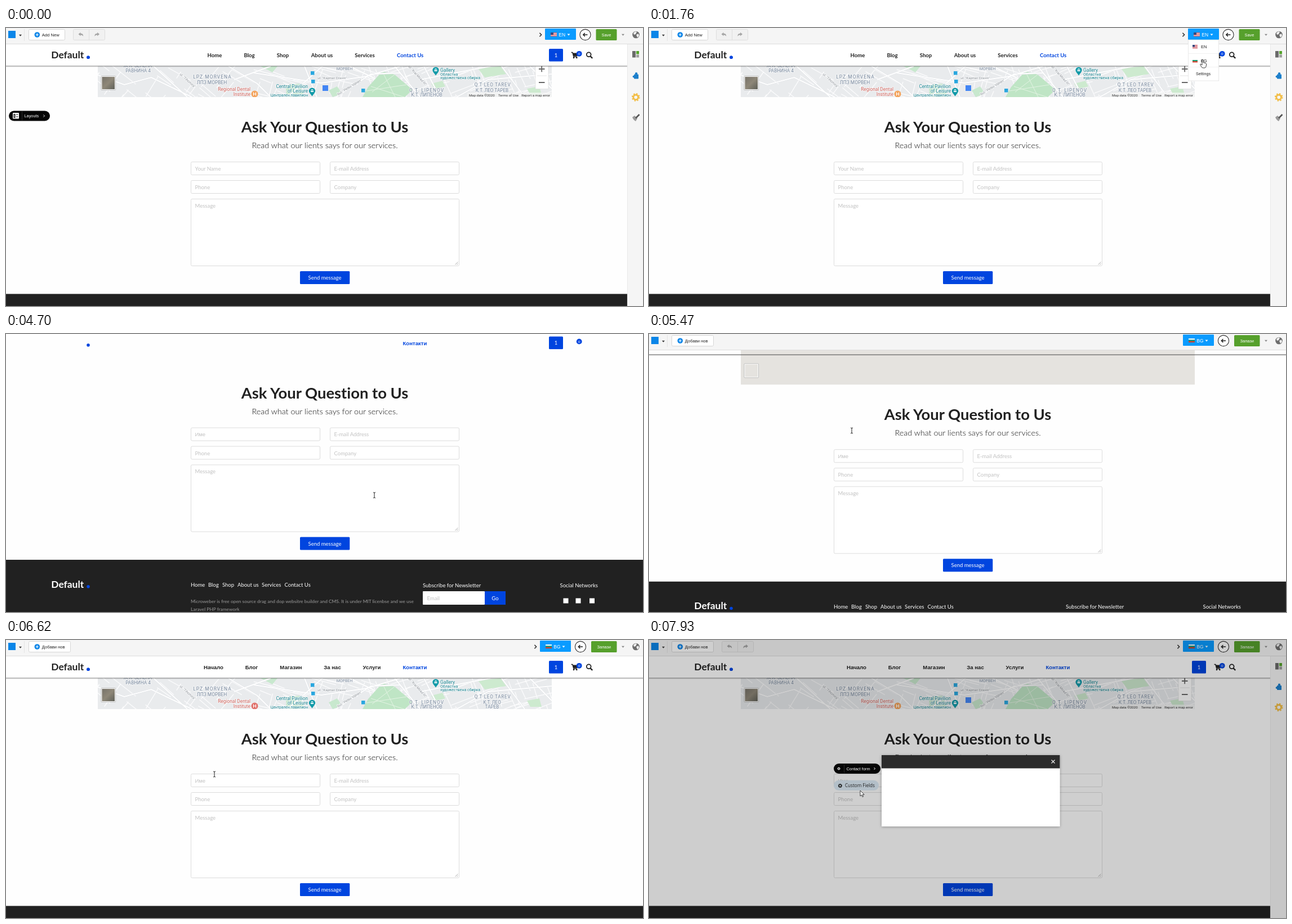
These frames come from a looping animation (1131x495 px, 8000 ms). An HTML page:

```html
<!DOCTYPE html>
<html lang="en">
<head>
<meta charset="utf-8">
<title>Language switch</title>
<style>
html, body { margin: 0; width: 100%; height: 100%; overflow: hidden; background: #fff; }
svg { display: block; width: 100vw; height: 100vh; }
text { white-space: pre; font-variant-ligatures: none; }
.ui { font-family: "Liberation Sans", Arial, sans-serif; }
.page { font-family: Lato, sans-serif; }
.map { font-family: Roboto, "Noto Sans", sans-serif; }
</style>
</head>
<body>
<svg id="stage" viewBox="0 0 1131 495" xmlns="http://www.w3.org/2000/svg"></svg>
<script>
const LOOP = 8000, BLUE = '#0045df', INK = '#212121';

const rect = (x, y, w, h, fill, extra = '') =>
  `<rect x="${x}" y="${y}" width="${w}" height="${h}" fill="${fill}" ${extra}/>`;
const circle = (x, y, r, fill, extra = '') =>
  `<circle cx="${x}" cy="${y}" r="${r}" fill="${fill}" ${extra}/>`;
const path = (d, stroke, width = 1, extra = '') =>
  `<path d="${d}" fill="none" stroke="${stroke}" stroke-width="${width}" ${extra}/>`;
const shape = (d, fill, extra = '') => `<path d="${d}" fill="${fill}" ${extra}/>`;
const text = (x, y, s, size, fill, extra = '') =>
  `<text x="${x}" y="${y}" font-size="${size}" fill="${fill}" ${extra}>${s}</text>`;
const group = (id, body, extra = '') => `<g id="${id}" ${extra}>${body}</g>`;
const MID = 'text-anchor="middle"', END = 'text-anchor="end"';
const MID_BOLD = MID + ' font-weight="700"';

const caret = (x, y, fill) => shape(`M${x - 2.5} ${y - 1.2}h5l-2.5 3z`, fill);
const chevron = (x, y, s, color, w) => path(`M${x - s / 2} ${y - s}l${s} ${s}l${-s} ${s}`, color, w);
const gear = (x, y, r, fill) =>
  circle(x, y, r * .6, 'none', `stroke="${fill}" stroke-width="${r * .4}"`) +
  circle(x, y, r * .88, 'none',
    `stroke="${fill}" stroke-width="${r * .28}" stroke-dasharray="${r * .3456}"`);

function seeded(seed) {
  return () => (seed = (seed * 16807) % 2147483647) / 2147483647;
}

function usFlag(x, y, w, h) {
  let s = rect(x, y, w, h, '#f3e6e8');
  for (let i = 0; i < 4; i++) s += rect(x, y + i * h / 3.5, w, h / 7, '#d0505c');
  return s + rect(x, y, w * .45, h * .55, '#35477d');
}
const bgFlag = (x, y, w, h) =>
  rect(x, y, w, h / 3, '#fff') + rect(x, y + h / 3, w, h / 3, '#159a70') +
  rect(x, y + h * 2 / 3, w, h / 3, '#d33b28');

/* Map */
function streets() {
  const rnd = seeded(71);
  let s = '';
  for (let i = 0; i < 150; i++) {
    const x = 150 + rnd() * 830, y = 60 + rnd() * 70, len = 14 + rnd() * 48;
    const a = (x < 420 ? .5 : x < 640 ? .18 : -.45) + (rnd() < .5 ? Math.PI / 2 : 0) + rnd() * .25;
    const dx = Math.cos(a) * len, dy = Math.sin(a) * len;
    s += `M${x.toFixed(1)} ${y.toFixed(1)}l${dx.toFixed(1)} ${dy.toFixed(1)}`;
  }
  return path(s, '#fcfcfd', 1.3);
}

function mapArt() {
  const main = 'M163 84L210 101 258 88 330 123M262 68L322 123M395 68L446 99 470 123M405 92L470 68' +
    'M440 80L560 98 640 86 700 68M530 68L552 123M500 123L562 68M586 123L648 82 700 80M610 68L655 90' +
    'M742 68L770 123M690 68L735 123M735 92L860 68M800 123L856 92 969 82M880 68L921 123M930 68L969 108';
  const label = (x, y, s, size, fill = '#75859a', extra = '') => text(x, y, s, size, fill, extra);
  const teal = '#16818d', halo = 'stroke="#f8f9fa" stroke-width="1.6" paint-order="stroke"';
  const pin = (x, y, c) => circle(x, y, 5.6, c) + shape(`M${x - 4.4} ${y + 3.4}h8.8l-4.4 6z`, c) +
    shape(`M${x - 3} ${y - 1}l3-2 3 2zM${x - 2.5} ${y}h5v2h-5z`, '#fff');
  return rect(163, 40, 806, 83, '#e9ebed') + streets() +
    shape('M668 77L690 83 722 110 708 123H633L643 105z', '#bfe5c5') +
    shape('M497 102l24-3 10 24h-33zM573 111l15-7 9 13-17 6zM452 68h30l-9 11z', '#c8e8ce') +
    shape('M755 99l20-5 5 10-19 5zM838 72l40-4 10 14-38 6zM925 108l22-4 4 15h-20z', '#cdeacf') +
    path('M648 104L707 123M650 114L690 83M668 77L691 123M640 112L711 101', '#e3f3e3', 1) +
    path(main, '#dde0e5', 2.8) + path(main, '#fff', 2) +
    `<g ${halo}>` +
    label(234, 70, 'Ж.К. ЗЕЛЕНА', 8.2, undefined, MID) +
    label(234.5, 79, 'РАВНИНА 4', 8.2, undefined, MID) +
    label(366.5, 90, 'LPZ MORVENA', 8.4, undefined, MID + ' letter-spacing="1.1"') +
    label(365.5, 100, 'ЛПЗ МОРВЕН', 8.4, undefined, MID) +
    label(434, 112, 'Regional Dental', 8.3, '#cf625a', END) +
    label(434, 120.5, 'Institute', 8.3, '#cf625a', END) +
    label(536, 107, 'Central Pavilion', 8.2, teal, END) +
    label(536, 115, 'of Leisure', 8.2, teal, END) +
    label(536, 121.5, 'Централен павилион', 6.7, teal, END) +
    label(771, 77.5, 'Gallery', 8.5, teal) +
    label(771, 84.5, 'Областна', 7, teal) +
    label(771, 91, 'художествена сбирка', 7, teal) +
    label(601, 75, 'МОРВЕН', 7, undefined, MID) +
    label(747, 114, 'Q.T. LIPENOV', 8.4, undefined, MID + ' letter-spacing="1"') +
    label(747, 122, 'К.Т. ЛИПЕНОВ', 8.4, undefined, MID) +
    label(864, 104, 'Q T LEO TAREV', 8.2, undefined, MID + ' letter-spacing=".7"') +
    label(579, 90.5, 'ul. "Kapitan Dravin"', 6.2, '#8b9096', MID) +
    label(0, 0, 'bul. "Petko Valnev"', 6, '#8b9096', 'transform="translate(590 120) rotate(-32)"') +
    label(0, 0, 'ul. "Tihomira"', 6, '#8b9096', 'transform="translate(308 83) rotate(42)"') +
    label(0, 0, 'ul. "Kral Mirad III"', 6, '#8b9096', 'transform="translate(714 69) rotate(48)"') +
    '</g>' +
    pin(543.5, 112, '#129aa8') + pin(763, 75, '#129aa8') +
    [[541, 77], [542, 92], [631, 108]].map(([x, y]) => rect(x, y, 6.5, 6.5, '#2aa7df')).join('') +
    circle(441.5, 117.5, 6, '#f3a35c', 'id="clinic"') +
    path('M439.5 114.5v6M443.5 114.5v6M439.5 117.5h4', '#fff', 1.2) +
    group('oneLine', `<g ${halo}>` + label(863, 113.5, 'К.Т. ЛЕО ТАРЕВ', 8.2, undefined, MID) + '</g>') +
    group('twoLines', `<g ${halo}>` + label(863, 113.5, 'К.Т. ЛЕО', 8.2, undefined, MID) +
      label(863, 121.5, 'ТАРЕВ', 8.2, undefined, MID) + '</g>');
}

const credit = rect(562, 102, 10, 10, '#4285f4') + rect(819, 115, 150, 8, '#f5f5f5', 'opacity=".75"') +
  text(822, 121.5, 'Map data ©2020', 6.1, '#333') + text(874, 121.5, 'Terms of Use', 6.1, '#333') +
  text(966, 121.5, 'Report a map error', 6.1, '#333', END);

const zoom = rect(940, 62, 23, 46.5, '#fff', 'stroke="#d8d8d8" stroke-width=".6"') +
  path('M943 85h17', '#e3e3e3') + path('M946 73h10.5M951.2 67.8v10.4M946 97h10.5', '#666', 1.8);

const thumb = rect(169, 85.5, 25.5, 25, '#fff', 'stroke="#aaa" stroke-width=".7" rx="1"') +
  rect(170.5, 87, 22.5, 22, '#e5e3df');

/* Page body */
const field = (x, y, w, h) =>
  rect(x + .5, y + .5, w - 1, h - 1, '#fff', 'stroke="#dcdcdc" rx="2"');
const hint = (x, y, s) => text(x, y, s, 9.5, '#c2c2c2');
const dotLogo = (y, fill) => text(80.3, y, 'Default', 17.4, fill, 'font-weight="700"') +
  circle(146, y - 1.8, 2.8, BLUE);

const form = text(566, 186, 'Ask Your Question to Us', 27.4, INK, MID_BOLD) +
  text(566, 214, 'Read what our lients says for our services.', 14.4, '#111', MID + ' font-weight="300"') +
  field(328, 238, 230, 24) + field(575, 238, 230, 24) +
  field(328, 271, 230, 24) + field(575, 271, 230, 24) + field(328, 304, 477, 120) +
  group('nameEn', hint(335.5, 253.5, 'Your Name')) +
  group('nameBg', hint(335.5, 253.5, 'Име'), 'class="ui"') +
  hint(582.5, 253.5, 'E-mail Address') + hint(335.5, 287, 'Phone') +
  hint(582.5, 287, 'Company') + hint(335.5, 319.5, 'Message') +
  path('M797.5 421.5l5-5M800.5 421.5l2-2', '#999', .8) +
  rect(522, 433, 88.3, 23, BLUE, 'rx="1.5"') + text(566, 448, 'Send message', 9.5, '#fff', MID);

const footLink = (x, y, s) => text(x, y, s, 9.5, '#fff');
const footer = rect(0, 473.5, 1131, 140, INK) + dotLogo(523, '#fff') +
  [[328, 'Home'], [359, 'Blog'], [384, 'Shop'], [411, 'About us'], [454, 'Services'], [494.5, 'Contact Us']]
    .map(([x, s]) => footLink(x, 521.5, s)).join('') +
  text(328, 550.5, 'Microweber is free open source drag and dop websitre builder and CMS. It is under MIT licenbse and we use', 8.4, '#9c9c9c') +
  text(328, 564.5, 'Laravel PHP framework', 8.4, '#9c9c9c') +
  footLink(740, 522, 'Subscribe for Newsletter') + footLink(983.5, 522, 'Social Networks') +
  rect(740, 529.5, 110, 24, '#fff', 'rx="1"') + hint(747.5, 545, 'Email') +
  rect(850, 529.5, 37, 24, BLUE) + text(868.5, 545, 'Go', 9.5, '#fff', MID) +
  [989.5, 1011.5, 1036].map(x => rect(x, 542, 9, 9, '#fff')).join('');

/* Site header */
const navItem = (x, y, s, fill) => text(x, y, s, 9.6, fill, MID_BOLD);
const navEn = [[370.5, 'Home'], [432, 'Blog'], [491.5, 'Shop'], [561, 'About us'], [637, 'Services']]
  .map(([x, s]) => navItem(x, 51.7, s, INK)).join('') + navItem(717.7, 51.7, 'Contact Us', BLUE);
const navBg = [[368.5, 'Начало'], [436, 'Блог'], [506, 'Магазин'], [579.5, 'За нас'], [649.5, 'Услуги']]
  .map(([x, s]) => navItem(x, 52, s, INK)).join('');
const blueParts = circle(146, 52.2, 2.8, BLUE) + rect(964, 37, 25, 22.5, BLUE, 'rx="1.5"') +
  text(976.5, 51.5, '1', 9.5, '#fff', MID) + circle(1017.7, 45.8, 4.9, BLUE) +
  text(1017.7, 48.2, '0', 6.5, '#fff', MID);
const cart = path('M1003.5 43.5h2.4l2 7.8h6.3', INK, 1.4) + shape('M1006.3 44.5h9.5l-1.2 5.6h-7z', INK) +
  circle(1008, 53, 1.3, INK) + circle(1013.3, 53, 1.3, INK);
const loupe = circle(1034.7, 47.3, 3.9, 'none', `stroke="${INK}" stroke-width="1.8"`) +
  path('M1037.6 50.3l3.6 3.6', INK, 2.3);

/* Editor chrome */
const saveSet = (x, w, label, size) => rect(x, 2, w, 20, '#56a02c', 'rx="1.5"') +
  text(x + w / 2, 14.8, label, size, '#fff', MID);
const addButton = (w, label) => rect(40.5, 2.5, w, 19, '#fff', 'stroke="#d6d6d6" rx="2"') +
  circle(55.3, 12, 4.8, '#0b86e8') + path('M52.8 12h5M55.3 9.5v5', '#fff', 1.2) +
  text(63.7, 14.9, label, 7.65, '#222');
const langButton = (x, label, flag) => rect(x, 1, 55, 20, '#0a9bff', 'rx="1"') + flag +
  text(x + 24.3, 14.5, label, 8.5, '#fff') + caret(x + 42, 11.6, '#fff');
const backButton = x => circle(x, 12, 9.6, '#fff', 'stroke="#333" stroke-width="1.1"') +
  path(`M${x + 4} 12h-7.5M${x - .6} 9l-3 3 3 3`, '#222', 1.6);
const undo = x => rect(x + .5, 2.5, 56, 19, '#f1f1f1', 'stroke="#dedede" rx="2"') +
  path(`M${x + 28.5} 3v18`, '#dedede') +
  shape(`M${x + 9.5} 11l4-3.2v2q5 0 4.6 5-1.3-2.6-4.6-2.5v2z`, '#a5a5a5') +
  shape(`M${x + 47} 11l-4-3.2v2q-5 0-4.6 5 1.3-2.6 4.6-2.5v2z`, '#a5a5a5');

const toolbar = rect(0, 0, 1131, 29, '#f5f5f5') + path('M0 28.5h1131', '#dcdcdc') +
  rect(4, 5, 13, 13, '#0b86e8') + caret(25.5, 13, '#333') + path('M32.5 2v21', '#e4e4e4') +
  caret(1095.5, 12, '#888') + circle(1118.5, 12, 6.3, '#6d6d6d') +
  shape('M1114 9q3-4 6-2l-2 4-3 1zM1119 12l4-2 1 4-3 3z', '#f0f0f0') +
  group('barEn', addButton(64, 'Add New') + undo(119) + chevron(949, 12, 3.2, '#333', 1.6) +
    langButton(957, 'EN', usFlag(967, 8, 11, 7)) + backButton(1028.5) + saveSet(1047.5, 37, 'Save', 7.4)) +
  group('barBg', addButton(74, 'Добави нов') + group('undoBg', undo(129)) +
    group('moreBg', chevron(940, 12, 3.2, '#333', 1.6)) +
    langButton(948, 'BG', bgFlag(958, 8, 11, 7)) + backButton(1020) + saveSet(1039, 45.5, 'Запази', 7.5));

const sidebar = rect(1103, 29, 28, 466, '#f5f5f5') + path('M1103.4 29v466', '#e6e6e6', .8) +
  rect(1112, 41, 6, 11.5, '#6b6b6b') + rect(1119, 41, 5, 5.5, '#57a52e') + rect(1119, 47.5, 5, 5, '#a0a0a0') +
  group('puzzle', rect(1115, 82.5, 8, 8, '#1c7fcb', 'rx=".8"') +
    circle(1119, 81.2, 2.2, '#1c7fcb') + circle(1114.6, 86.5, 2, '#1c7fcb')) +
  group('cog', gear(1118.2, 123.3, 7.2, '#f2bd45')) +
  group('brush', shape('M1112 159l4-3 5 5-3 5q-4-2-6-7z', '#9a9a9a') + path('M1118 160.5l6.5-6.5', '#555', 2.6));

const menu = rect(957.3, 21, 54.4, 73, '#fff', 'stroke="#ddd" stroke-width=".7"') +
  path('M957.5 45.5h54M957.5 69.5h54', '#eee', .8) + usFlag(965, 30, 9, 6.5) +
  text(985.2, 36, 'EN', 7.6, '#222', MID) + bgFlag(965, 54.8, 9, 6.5) +
  text(985.2, 60.5, 'BG', 7.6, '#222', MID) + text(984, 84.3, 'Settings', 7.2, '#222', MID);

const pill = (x, y, w, split, label, icon) => rect(x, y, w, 18, '#050505', 'rx="9"') +
  path(`M${split} ${y + 1}v16`, '#333', .8) + text(split + 4, y + 11.5, label, 7.35, '#fff') +
  chevron(x + w - 10.5, y + 9, 2, '#fff', 1) + icon;
const layouts = pill(5, 147.5, 73, 28.5, 'Layouts',
  rect(12, 151, 11, 10.5, '#fff', 'rx="1"') + path('M14 153.5h2v6h-2zM18 154h3.5M18 158h3.5', '#111', 1.2));
const envelope = rect(334, 225, 12.5, 8.5, '#e0149c') +
  path('M334 225l6.2 5 6.3-5M334 233.5l4.5-4.5M346.5 233.5l-4.5-4.5', '#300', .9);
const corners = [[328.5, 238.5], [804.5, 238.5], [328.5, 433.5], [804.5, 433.5]]
  .map(([x, y]) => rect(x - 1.5, y - 1.5, 3, 3, '#a9b7c4')).join('');
const picked = rect(328.5, 238.5, 476, 195, 'none', 'stroke="#b7cbdd"') + corners +
  pill(328, 220, 89, 352, 'Contact form', envelope);
const fieldsPill = fill => rect(328, 249.8, 80, 18, fill, 'rx="9"') + gear(339.3, 259.5, 3.6, '#222') +
  text(348, 262, 'Custom Fields', 8.1, '#222', 'font-family="Open Sans, sans-serif"');

const modal = rect(413, 205, 316.5, 127, '#fff', 'filter="url(#soft)"') +
  rect(413, 205, 316.5, 23.5, '#2b2b2b') + path('M714.5 213.5l6 6M720.5 213.5l-6 6', '#eee', 1.2);

document.getElementById('stage').innerHTML = `<defs>
  <clipPath id="mapClip"><rect x="163" y="29" width="806" height="94"/></clipPath>
  <linearGradient id="photo" x2="1" y2="1"><stop stop-color="#77736a"/><stop offset=".5" stop-color="#8e8778"/><stop offset="1" stop-color="#5f6058"/></linearGradient>
  <linearGradient id="shade" x2="0" y2="1"><stop stop-color="#000" stop-opacity=".38"/><stop offset="1" stop-color="#000" stop-opacity="0"/></linearGradient>
  <filter id="soft" x="-10%" y="-10%" width="120%" height="125%"><feDropShadow dx="0" dy="1" stdDeviation="2.5" flood-opacity=".3"/></filter>
  </defs>` + rect(0, 0, 1131, 495, '#fefefe') +
  group('body',
    group('map', rect(163, 29, 806, 94, '#e5e3df') + group('mapArt', mapArt()) + thumb +
      group('photoTile', rect(170.5, 87, 22.5, 22, 'url(#photo)')) +
      group('credit', credit) + group('zoom', zoom), 'class="map" clip-path="url(#mapClip)"') +
    form + footer, 'class="page"') +
  group('header',
    group('headerBack', rect(0, 29, 1131, 38.5, '#fff') + rect(0, 67, 1131, 3, 'url(#shade)')) +
    group('headerLine', path('M0 68h1131', '#444', 1.1)) +
    group('headerInk', dotLogo(54, INK) + cart + loupe) + blueParts +
    group('navEn', navEn) + group('navBg', navBg, 'class="ui"') +
    group('navHere', navItem(726, 52, 'Контакти', BLUE), 'class="ui"'), 'class="page"') +
  group('chrome', group('sidebar', sidebar) + group('toolbar', toolbar) + group('menu', menu) +
    group('layouts', layouts) + group('picked', picked) + group('fields', fieldsPill('#dce7ef')), 'class="ui"') +
  group('dim', rect(0, 0, 1131, 495, '#000')) +
  group('editing', pill(328, 220, 83, 346.5, 'Contact form', gear(337, 229, 2.6, '#fff')) +
    fieldsPill('#b3bfc8'), 'class="ui"') +
  group('modal', modal) +
  group('arrow', shape('M0 0v10l2.4-2.2 1.6 3.6 1.6-.7-1.6-3.5h3.2z', '#fff', 'stroke="#111" stroke-width=".8"')) +
  group('hand', shape('M-1 .5q1-1.2 2 0v5l4 1q1.8.6 1.7 2.5l-.7 3.5q-.5 2-2 2.5h-4q-2-.5-4.2-5.5-.4-1.8 1.2-1.2l2 1.7z', '#fff', 'stroke="#111" stroke-width=".8"')) +
  group('beam', path('M-2-5q2 0 2 1.2q0-1.2 2-1.2M0-4v8M-2 5q2 0 2-1.2q0 1.2 2 1.2', '#222', 1));

const el = id => document.getElementById(id);
const show = (id, on) => el(id).style.display = on ? '' : 'none';
const move = (id, x, y) => el(id).setAttribute('transform', `translate(${x} ${y})`);

/* time, then values; movement advances in short steps like a screen recording */
const STEP = 76.7;
function track(keys, t) {
  let i = keys.length - 1;
  while (i > 0 && keys[i][0] > t) i--;
  const a = keys[i], b = keys[i + 1];
  if (!b) return a.slice(1);
  const u = Math.min(1, Math.floor((t - a[0]) / STEP + .01) * STEP / (b[0] - a[0]));
  const k = u * u * (3 - 2 * u);
  return a.slice(1).map((v, j) => v + (b[j + 1] - v) * k);
}

const cursorPath = [[70, 1088, 460], [830, 985, 10], [910, 986, 12], [1680, 983, 56],
  [2310, 983, 56], [2770, 661, 286], [3630, 661, 286], [3860, 662, 284], [4623, 662, 284],
  [4700, 654, 287], [5470, 360, 172], [6240, 370, 239], [6620, 370, 239], [6930, 362, 352],
  [7160, 354, 244], [7240, 355, 245], [7390, 360, 250], [7550, 370, 256], [7700, 371, 254],
  [7850, 375, 267], [7930, 375, 268]];
const bodyShift = [[4700, -71.5], [5163, -71.5], [5470, -32.7], [6240, 0]];
const headerShift = [[4700, -32.4], [5470, -31], [5550, -31], [6240, 0]];

function draw(t) {
  const within = (a, b) => t >= a && t < b;
  const bg = t >= 4700, bare = within(4700, 5240), partial = within(4700, 6390);

  move('body', 0, bg ? track(bodyShift, t)[0] : 0);
  move('header', 0, bg ? track(headerShift, t)[0] : 0);

  show('nameEn', !bg);
  show('nameBg', bg);
  show('navEn', !bg);
  show('navBg', bg && !bare);
  show('navHere', bg);
  show('headerInk', !bare);
  show('headerBack', !within(4700, 5550));
  show('headerLine', within(5240, 5550));

  show('map', !bare);
  show('mapArt', !partial);
  show('photoTile', !partial);
  show('credit', !within(4700, 7240));
  show('zoom', !within(4700, 7390));
  show('oneLine', !within(4700, 7240));
  show('twoLines', within(4700, 7240));
  el('clinic').setAttribute('fill', within(4700, 7240) ? '#e0716b' : '#f3a35c');

  show('toolbar', !bare);
  show('barEn', !bg);
  show('barBg', bg);
  show('moreBg', t >= 6390);
  show('undoBg', t >= 7850);
  show('sidebar', !within(4700, 7850));
  show('brush', !bg);
  move('puzzle', 0, bg ? -1.5 : 0);
  move('cog', 0, bg ? -3.5 : 0);

  show('menu', within(910, 2310));
  show('layouts', t < 220 || within(2390, 2540));
  show('picked', within(2620, 4700));
  show('fields', within(2770, 3100));
  show('editing', t >= 7850);
  show('dim', t >= 7850);
  el('dim').setAttribute('opacity', t >= 7930 ? .19 : .1);
  show('modal', t >= 7930);

  const kind = t < 70 ? '' : within(910, 2310) ? 'hand' : within(2620, 7390) ? 'beam' : 'arrow';
  const [x, y] = track(cursorPath, t);
  for (const id of ['arrow', 'hand', 'beam']) {
    show(id, id === kind);
    move(id, x, y);
  }
}

const start = performance.now();
function tick() {
  draw((performance.now() - start) % LOOP);
  requestAnimationFrame(tick);
}
draw(0);
requestAnimationFrame(tick);
</script>
</body>
</html>
```
